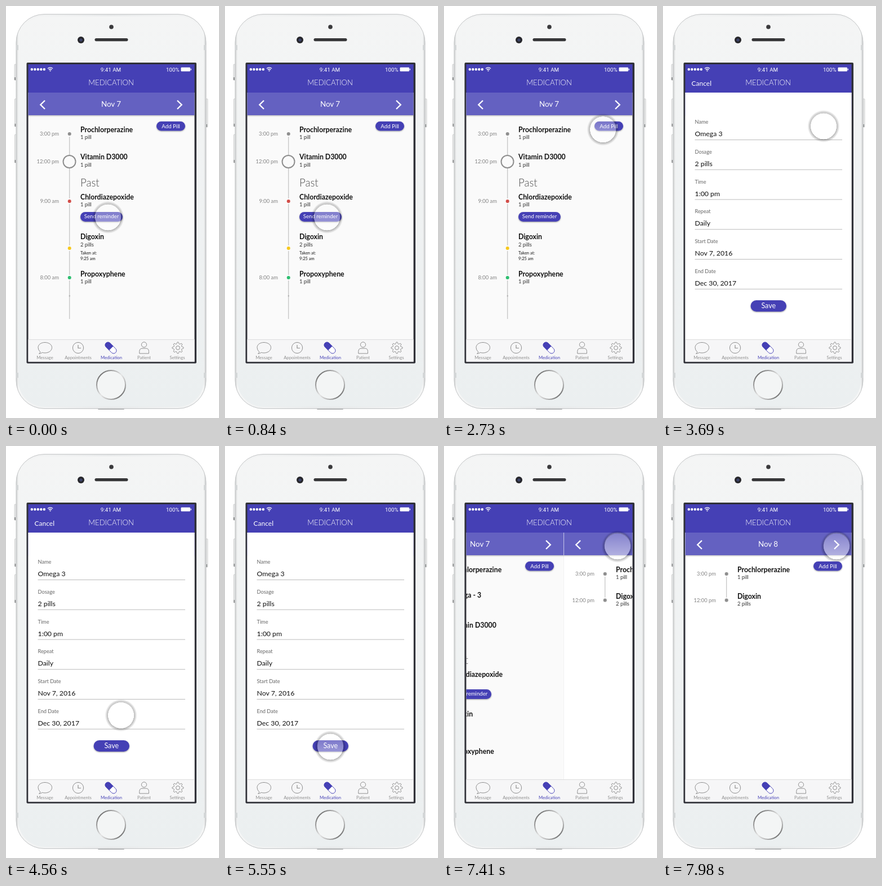
Animation of 378 by 728 pixels, one loop 8000 ms. Source, as an HTML page:

```html
<!DOCTYPE html>
<html lang="en">
<head>
<meta charset="utf-8">
<title>Medication schedule</title>
<style>
  html, body { margin: 0; width: 100%; height: 100%; overflow: hidden; background: #fff; }
  svg { display: block; width: 100vw; height: 100vh; font-family: Lato, "Open Sans", sans-serif; }
  .status { font-family: Roboto, Arial, sans-serif; }
</style>
</head>
<body>
<svg id="stage" viewBox="0 0 378 728"></svg>
<script>
const PURPLE = '#4540b5', GREY = '#8e8e8e';

// Markup helpers
const text = (x, y, size, content, { fill = '#111', weight = 400, anchor = 'start', cls = '' } = {}) =>
  `<text x="${x}" y="${y}" font-size="${size}" fill="${fill}" font-weight="${weight}" text-anchor="${anchor}" class="${cls}">${content}</text>`;
const rect = (x, y, w, h, fill, extra = '') =>
  `<rect x="${x}" y="${y}" width="${w}" height="${h}" fill="${fill}" ${extra}/>`;
const circle = (x, y, r, fill, extra = '') =>
  `<circle cx="${x}" cy="${y}" r="${r}" fill="${fill}" ${extra}/>`;
const path = (d, stroke, width, extra = '') =>
  `<path d="${d}" fill="none" stroke="${stroke}" stroke-width="${width}" ${extra}/>`;
const group = (id, content, extra = '') => `<g id="${id}" ${extra}>${content}</g>`;
const stops = list => list.map(([at, color, alpha = 1]) =>
  `<stop offset="${at}" stop-color="${color}" stop-opacity="${alpha}"/>`).join('');

const button = (x, y, w, h, label, size, baseline) =>
  rect(x, y, w, h, PURPLE, `rx="${h / 2}" filter="url(#lift)"`) +
  text(x + w / 2, baseline, size, label, { fill: '#fff', anchor: 'middle' });

const defs = `<defs>
  <linearGradient id="edge">${stops([[0, '#c9cbcc'], [.012, '#f4f5f5'], [.5, '#e6e8e9'], [.988, '#f4f5f5'], [1, '#c4c6c7']])}</linearGradient>
  <linearGradient id="face" x2="0" y2="1">${stops([[0, '#f4f5f5'], [1, '#ebeff0']])}</linearGradient>
  <linearGradient id="ring" x2="1" y2="1">${stops([[0, '#444'], [.25, '#999'], [.5, '#e6e6e6'], [.75, '#aaa'], [1, '#333']])}</linearGradient>
  <linearGradient id="touch" x2="0" y2="1">${stops([[0, '#fff', .2], [1, '#fff', .55]])}</linearGradient>
  <radialGradient id="halo">${stops([[.8, '#000', 0], [.81, '#000', .28], [1, '#000', 0]])}</radialGradient>
  <linearGradient id="underline" x2="0" y2="1">${stops([[0, '#000', .22], [1, '#000', 0]])}</linearGradient>
  <filter id="lift" x="-20%" y="-30%" width="140%" height="180%"><feDropShadow dx="0" dy="1" stdDeviation=".9" flood-opacity=".4"/></filter>
  <clipPath id="screenClip">${rect(39.5, 103, 295, 525.5, '#000')}</clipPath>
</defs>`;

function phone() {
  const sideKeys = [[15, 103, 28], [15.5, 164, 49], [15.5, 227, 50], [355, 164, 50]].map(([x, y, h]) =>
    rect(x, y, 3, h, '#eceded', 'rx="1" stroke="#b5b7b8" stroke-width=".6"') +
    rect(x, y + h - 5, 2, 5, '#8d8f90')).join('');
  const antennas = [69, 648].map(y => rect(18, y, 5, 9, '#d3d6d7') + rect(350, y, 5, 9, '#d3d6d7')).join('');
  return sideKeys +
    rect(163, 709, 47, 4, '#9a9c9d', 'rx="1.5"') +
    rect(18, 14.5, 337, 697, 'url(#edge)', 'rx="50" stroke="#c3c5c6" stroke-width="1"') +
    antennas +
    rect(22, 18, 329, 690, 'url(#face)', 'rx="46"') +
    circle(187, 37, 3.8, '#3a3a3c') +
    circle(133, 60, 6, '#26262a') + circle(133, 60, 2.6, '#3d4469') +
    rect(157.5, 57, 59, 5.2, '#363638', 'rx="2.6"') +
    circle(186.5, 669.5, 25.5, '#f3f5f5', 'stroke="url(#ring)" stroke-width="2"') +
    rect(36.5, 100, 301.5, 531.5, '#303138', 'rx="2"');
}

function statusBar() {
  const white = { fill: '#fff', cls: 'status' };
  return [0, 1, 2, 3, 4].map(i => circle(45.8 + i * 5.5, 112, 2.2, '#fff')).join('') +
    path('M74 110.6Q78.5 106.6 83 110.6M75.8 112.7Q78.5 110.3 81.2 112.7', '#fff', 1.3) +
    circle(78.5, 114.5, 1.1, '#fff') +
    text(186, 115.6, 9.8, '9:41 AM', { ...white, anchor: 'middle' }) +
    text(284, 115.6, 9.8, '100%', white) +
    rect(310.5, 108.5, 16.5, 7, '#fff', 'rx="1.2"') + rect(327.6, 110.5, 1.4, 3, '#fff', 'rx=".6"');
}

function tabBar() {
  const gear = Array.from({ length: 65 }, (_, i) => {
    const angle = i / 64 * 2 * Math.PI;
    const r = 8.6 + 1.5 * Math.tanh(2.2 * Math.cos(angle * 8));
    return `${i ? 'L' : 'M'}${(305 + r * Math.cos(angle)).toFixed(2)} ${(604 + r * Math.sin(angle)).toFixed(2)}`;
  }).join('');
  const labels = [['Message', 69], ['Appointments', 128], ['Medication', 187], ['Patient', 245], ['Settings', 304]];
  return rect(39, 589, 297, 41, '#f6f6f7') + rect(39, 589, 297, .8, '#d8d8d8') +
    path('M61 611.5Q57 608 57 603.5C57 598 62.5 594.5 69 594.5S81.5 598 81.5 603.5 76 613 69 613Q66.5 613 64.5 612.3Q61.5 614.5 58.5 614.3Q60.5 613 61 611.5Z', GREY, 1) +
    circle(128, 604, 9.6, 'none', `stroke="${GREY}"`) + path('M128 599V604.5H133', GREY, 1.2) +
    `<g transform="rotate(45 186 604)">
      ${rect(174, 599, 24, 10, '#fff', `rx="5" stroke="${PURPLE}" stroke-width=".9"`)}
      <path d="M187 598.6H179A5.4 5.4 0 0 0 179 609.4H187Z" fill="${PURPLE}"/></g>` +
    circle(245, 598.4, 4.6, 'none', `stroke="${GREY}"`) +
    path('M236.8 614V610.5Q236.8 605 242 605H248.5Q253.4 605 253.4 610.5V614Z', GREY, 1) +
    path(gear, GREY, 1) + circle(305, 604, 3.4, 'none', `stroke="${GREY}"`) +
    labels.map(([label, x]) => text(x, 624, 7.7, label,
      { anchor: 'middle', fill: label === 'Medication' ? PURPLE : GREY })).join('');
}

// One row of the schedule; y is the centre of its marker
function dose({ y, name, amount, time, color = GREY, ring, nameY = y - 3, amountY = y + 9 }) {
  return (time ? text(94, y + 3.3, 9.4, time, { fill: '#858585', anchor: 'end' }) : '') +
    (ring ? circle(112.5, y, 11, '#fafafa', `stroke="${GREY}" stroke-width="2"`)
          : circle(112.7, y, 4, color, 'stroke="#fafafa" stroke-width="2"')) +
    text(132, nameY, 12.3, name, { weight: 700 }) +
    text(132, amountY, 9.4, amount, { fill: '#333' });
}

function dayPage(title, background, lineEnd, rows) {
  return rect(39, 153, 296, 476, background) +
    rect(39, 153, 296, 40, '#6461c1') + rect(39, 193, 296, 3, 'url(#underline)') +
    path('M69 167L61.3 174.5 69 182M304 167L311.7 174.5 304 182', '#fff', 2.4) +
    text(186.5, 178, 13.4, title, { fill: '#fff', anchor: 'middle' }) +
    rect(112, 226, 1.3, lineEnd - 226, '#c6c6c6') + rows +
    button(267, 204, 51, 16.5, 'Add Pill', 9.7, 215.5);
}

const first = dose({ y: 226, name: 'Prochlorperazine', amount: '1 pill', time: '3:00 pm' });

function today(withOmega) {
  const shift = withOmega ? 66 : 0, vitaminY = withOmega ? 325 : 275;
  const rows = first +
    (withOmega ? dose({ y: 271, name: 'Omega - 3', amount: '1 pill', time: '1:00 pm' }) : '') +
    dose({ y: vitaminY, nameY: vitaminY - 4, name: 'Vitamin D3000', amount: '1 pill', time: '12:00 pm', ring: true }) +
    rect(111.8, 511, 1.8, 2.5, '#aaa') +
    `<g transform="translate(0 ${shift})">` +
    text(132, 318.5, 18.6, 'Past', { fill: '#4c4c4c', weight: 300 }) +
    dose({ y: 345, name: 'Chlordiazepoxide', amount: '1 pill', time: '9:00 am', color: '#d24d48' }) +
    button(132, 364, 75, 17, 'Send reminder', 9.6, 375.3) +
    dose({ y: 428, nameY: 411.5, amountY: 425, name: 'Digoxin', amount: '2 pills', color: '#f6c81c' }) +
    text(132, 438.7, 7.5, 'Taken at:') + text(132, 449, 7.5, '9:25 am') +
    dose({ y: 480, nameY: 478, amountY: 490, name: 'Propoxyphene', amount: '1 pill', time: '8:00 am', color: '#2dbe70' }) +
    '</g>';
  return dayPage('Nov 7', '#fafafa', 553, rows);
}

const tomorrow = () => dayPage('Nov 8', '#fff', 272, first +
  dose({ y: 272.5, nameY: 270, amountY: 282, name: 'Digoxin', amount: '2 pills', time: '12:00 pm' })) +
  rect(39, 153, 1, 40, '#c9c8ea');

function form() {
  const fields = [['Name', 'Omega 3'], ['Dosage', '2 pills'], ['Time', '1:00 pm'],
    ['Repeat', 'Daily'], ['Start Date', 'Nov 7, 2016'], ['End Date', 'Dec 30, 2017']];
  return rect(39, 153, 297, 436, '#fff') +
    text(50.5, 140.5, 12, 'Cancel', { fill: '#fff' }) +
    fields.map(([label, value], i) => {
      const y = 208 + i * 52.75;
      return text(56.5, y, 9.2, label, { fill: '#666' }) + text(56.5, y + 22, 12.3, value) +
        rect(56.5, y + 28, 261.5, .9, '#b4b4b4');
    }).join('') +
    button(155.5, 520, 63.5, 20, 'Save', 12.5, 533.7);
}

const alertBox = () => rect(39, 103, 297, 526, '#4a4a4a', 'opacity=".56"') +
  rect(81, 310.5, 213, 111.5, '#f6f6f6', 'rx="8"') +
  rect(81, 387, 213, 1, '#3c3c3c') +
  text(187.5, 348.3, 13.2, 'A reminder has been sent', { anchor: 'middle' }) +
  text(187.5, 366.7, 13.2, 'to the patient.', { anchor: 'middle' }) +
  text(187.5, 410, 12.8, 'Dismiss', { anchor: 'middle', fill: '#4a8ede' });

document.getElementById('stage').innerHTML = defs + phone() +
  `<g clip-path="url(#screenClip)">` +
  group('before', today(false)) + group('after', today(true)) + group('next', tomorrow()) +
  rect(39, 103, 297, 50, PURPLE) +
  group('form', form()) +
  group('chrome', statusBar() +
    text(186.5, 140, 13.1, 'MEDICATION', { fill: '#fff', weight: 300, anchor: 'middle' }) + tabBar()) +
  group('alert', alertBox()) +
  group('finger', circle(0, 1.5, 28.5, 'url(#halo)') + circle(0, 0, 23.3, 'url(#touch)')) +
  '</g>';

// Motion
const LOOP = 8000, PAGE = 296;
const clamp = u => Math.min(1, Math.max(0, u));
const ramp = (t, start, length) => clamp((t - start) / length);
const ease = u => u < .5 ? 4 * u ** 3 : 1 - 4 * (1 - u) ** 3;
const pulse = (t, on, off, fade) => ramp(t, on, fade) - ramp(t, off, fade);

// Each move: start, duration, from, to, optional curve control point
const moves = [
  [1250, 550, [181, 372], [189, 405]],
  [2100, 784, [189, 405], [285, 211]],
  [4080, 742, [285, 211], [187, 530]],
  [5900, 823, [187, 530], [308, 176], [308, 307]],
];

function fingerAt(t) {
  const [start, length, from, to, bend] = moves.filter(m => t >= m[0]).pop() || moves[0];
  const u = ease(ramp(t, start, length));
  return from.map((a, i) => bend
    ? (1 - u) ** 2 * a + 2 * u * (1 - u) * bend[i] + u * u * to[i]
    : a + (to[i] - a) * u);
}

const part = Object.fromEntries(['before', 'after', 'next', 'form', 'chrome', 'alert', 'finger']
  .map(id => [id, document.getElementById(id)]));
const place = (node, x, y = 0) => node.setAttribute('transform', `translate(${x} ${y})`);
const show = (node, alpha) => {
  node.setAttribute('opacity', alpha);
  node.setAttribute('visibility', alpha > 0 ? 'visible' : 'hidden');
};

function draw(now) {
  const t = now % LOOP;
  const alertAlpha = pulse(t, 900, 2050, 200);
  const slide = PAGE * ease(ramp(t, 7129, 600));
  show(part.before, t < 5000 ? 1 : 0);
  show(part.after, t < 5000 ? 0 : 1);
  show(part.form, pulse(t, 3350, 5720, 250));
  show(part.alert, alertAlpha);
  show(part.chrome, 1 - alertAlpha);
  place(part.after, -slide);
  place(part.next, PAGE - slide);
  place(part.finger, ...fingerAt(t));
  requestAnimationFrame(() => draw(performance.now()));
}
draw(performance.now());
</script>
</body>
</html>
```
